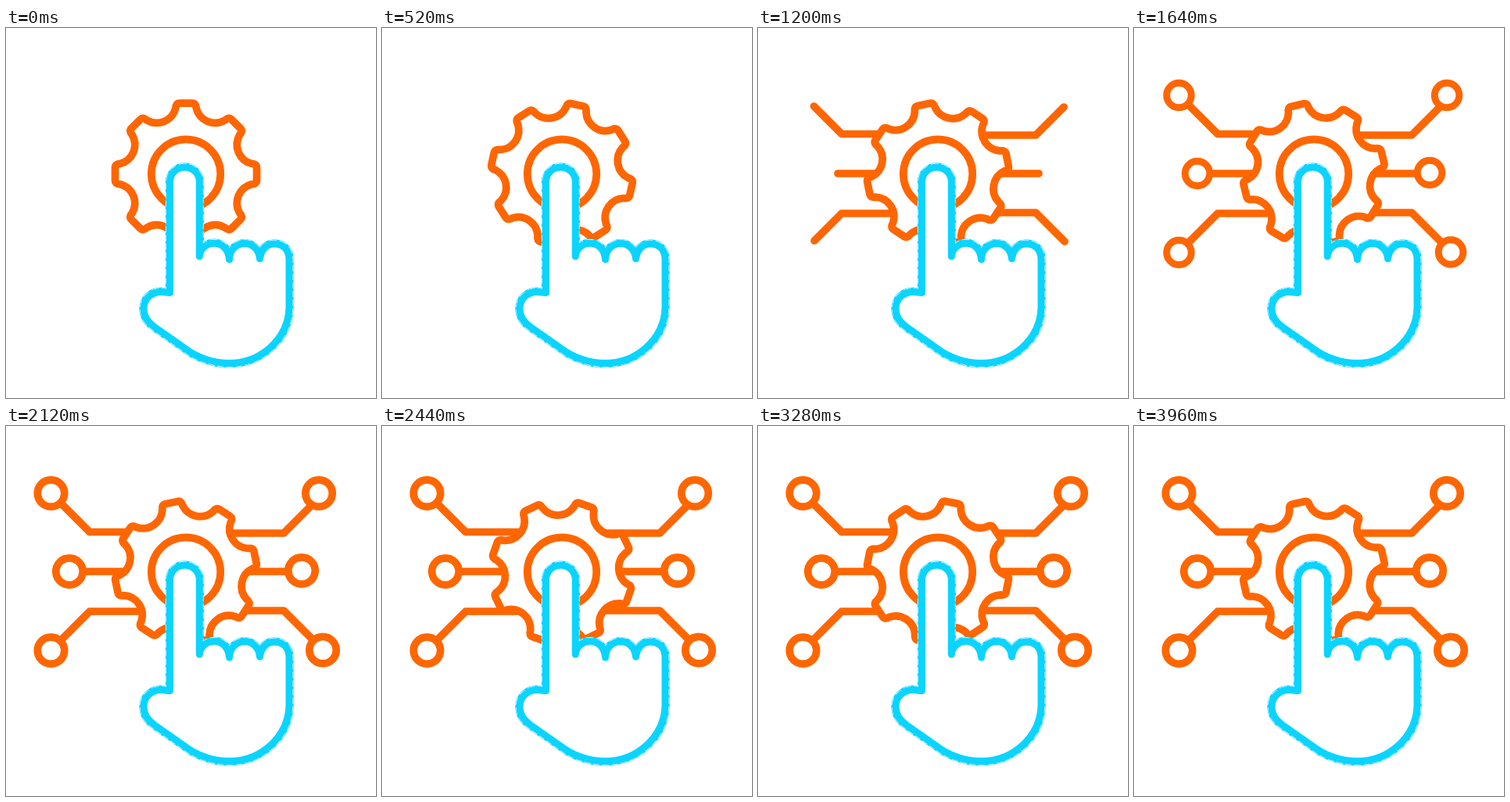
Write an HTML page that moves like this. It is 473 px wide and 473 px high and loops after 4 s.

```html
<!DOCTYPE html>
<html lang="en">
<head>
<meta charset="utf-8">
<title>Touch gear</title>
<style>
  html, body { margin: 0; width: 100%; height: 100%; overflow: hidden; background: #fff; }
  svg { display: block; width: 100vw; height: 100vh; }
  .orange { stroke: #ff6600; stroke-width: 9.7; }
  .cyan { stroke: #0ad4ff; }
  g { stroke-linecap: round; stroke-linejoin: round; }
</style>
</head>
<body>
<svg viewBox="0 0 473 473">
  <defs>
    <clipPath id="wipe"><rect id="window" y="0" height="473"/></clipPath>
    <path id="handShape" d="M209.5 338.5V196.8A18.9 18.9 0 0 1 247.3 196.8V292
      C249 270 284 268 285.5 296C286 270 322 268 324.5 295
      C326 282 334 276 343 276C355 276 362 284 362 296V358
      C360.5 398 325.5 428.6 285 428.6C265 428.6 246 421 236 414.6L190.3 382.6
      C180.4 375.8 176 367 176 359C176 346 186 337.3 199 337.3Z"/>
  </defs>
  <g class="orange" fill="none" clip-path="url(#wipe)">
    <path d="M71.5 100L107 135.5H180M102 186H160M72 272L107 237H182"/>
    <path d="M391 101L355 137H281M359 186H300M392 273L355 236H281"/>
  </g>
  <g id="nodes" class="orange" fill="#fff"></g>
  <g class="orange" fill="#fff">
    <path id="gear"/>
    <circle cx="230" cy="186.6" r="44.2"/>
  </g>
  <g id="hand" class="cyan" fill="none">
    <use href="#handShape" stroke-width="11.4"/>
    <use href="#handShape" stroke="#fff" stroke-width="10.4" stroke-dasharray="8 3" stroke-linecap="butt"/>
    <use href="#handShape" fill="#fff" stroke-width="9"/>
  </g>
</svg>
<script>
const LOOP = 4000, STEP = 40;
const SPIN_START = 393, SPIN_RATE = 0.0974;
const $ = id => document.getElementById(id);
const progress = (t, from, to) => Math.min(1, Math.max(0, (t - from) / (to - from)));

function gearPath(teeth) {
  const tooth = [[-13.2, -84], [-13, -90.5], [-8, -90.5], [8, -90.5], [13, -90.5], [13.2, -84]];
  let d = "";
  for (let i = 0; i <= teeth; i++) {
    const a = i * 2 * Math.PI / teeth, c = Math.cos(a), s = Math.sin(a);
    const p = tooth.map(([x, y]) => `${(x * c - y * s).toFixed(2)} ${(x * s + y * c).toFixed(2)}`);
    d += i ? `A25 25 0 0 0 ${p[0]}` : `M${p[0]}`;
    if (i < teeth) d += `Q${p[1]} ${p[2]}L${p[3]}Q${p[4]} ${p[5]}`;
  }
  return d + "Z";
}
$("gear").setAttribute("d", gearPath(8));

const centers = [[57.5, 86], [81, 186], [57.5, 287], [400, 86], [378, 185], [405, 286.5]];
const nodes = centers.map(([x, y]) => {
  const node = document.createElementNS("http://www.w3.org/2000/svg", "circle");
  node.setAttribute("r", 17.2);
  $("nodes").append(node);
  return { node, x, y };
});

function draw(t) {
  // The hand presses, then the gear starts to turn.
  const press = 1 - 0.05 * Math.sin(Math.PI * progress(t, 0, 400));
  $("hand").setAttribute("transform", `translate(269 303) scale(${press}) translate(-269 -303)`);
  const angle = Math.max(0, t - SPIN_START) * SPIN_RATE;
  $("gear").setAttribute("transform", `translate(230 186.6) rotate(${angle})`);

  // The lines are uncovered outwards on both sides.
  const open = progress(t, 660, 1180);
  const left = 175 - 109 * open, right = 285 + 112 * open;
  $("window").setAttribute("x", left);
  $("window").setAttribute("width", right - left);

  const zoom = progress(t, 1200, 1680);
  $("nodes").style.display = zoom ? "" : "none";
  for (const { node, x, y } of nodes)
    node.setAttribute("transform", `translate(${x} ${y}) scale(${zoom})`);
}

const start = performance.now();
function tick() {
  const t = (performance.now() - start) % LOOP;
  draw(Math.floor(t / STEP) * STEP);
  requestAnimationFrame(tick);
}
tick();
</script>
</body>
</html>
```
